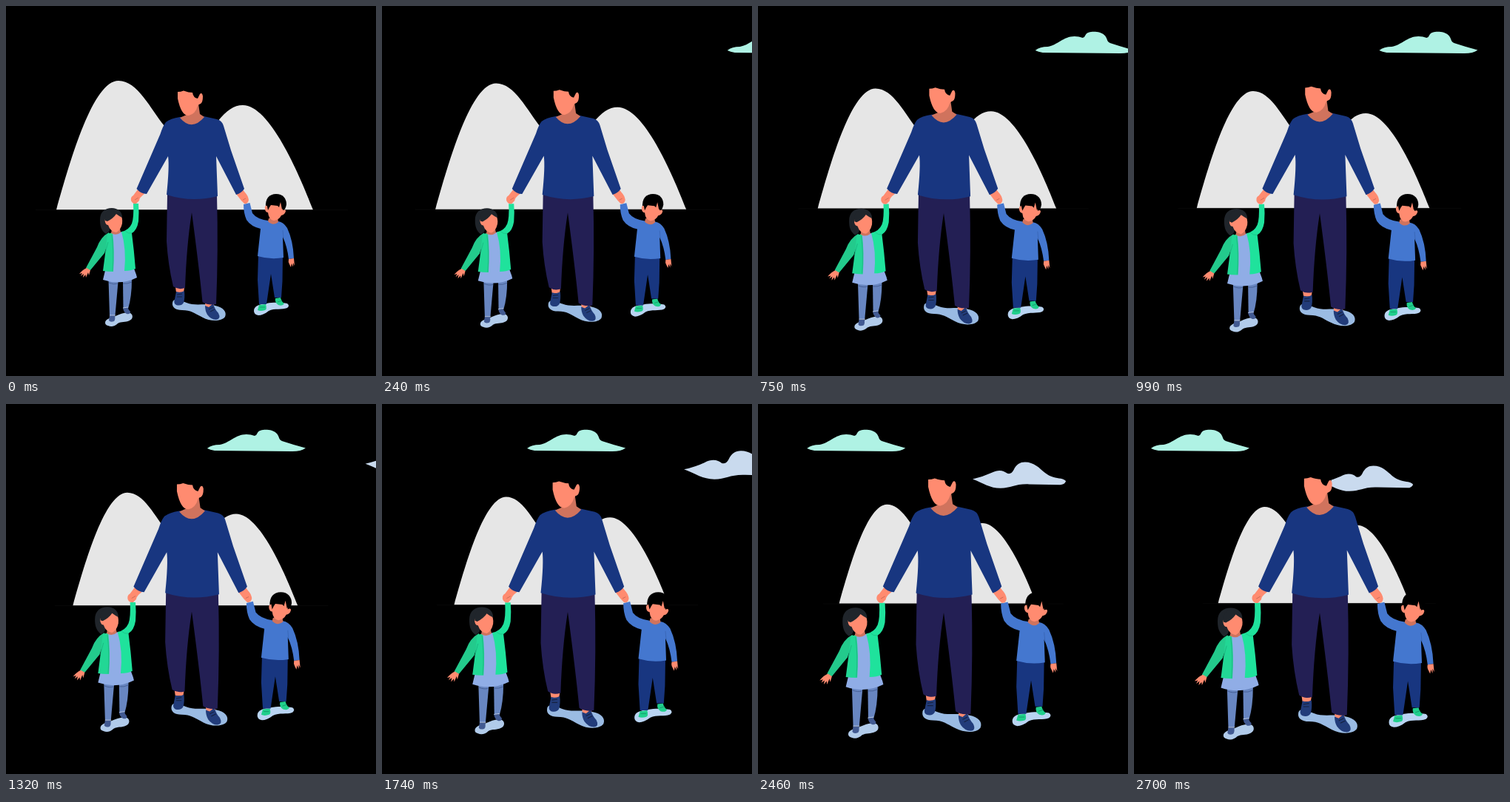
Animation of 500x500 px, one loop 2730 ms. Source, as an HTML page with a canvas:

```html
<!DOCTYPE html>
<html lang="en">
<head>
<meta charset="utf-8">
<title>Family walk</title>
<style>
  html, body { margin: 0; width: 100%; height: 100%; overflow: hidden; background: #000; }
  canvas { display: block; }
</style>
</head>
<body>
<canvas id="stage" width="500" height="500"></canvas>
<script>
const ctx = document.getElementById('stage').getContext('2d');
const LOOP = 2730;
const SKIN = '#ff8b70', NECK = '#d0735d', NAVY = '#183680', HAIR = '#20252b';
const GREEN = '#1fe29c', GREEN_DARK = '#23ca8c', SHOE = '#223c7a', INK = '#14203f';

const fill = (color, d) => ({ color, path: new Path2D(d) });
const line = (color, width, d) => ({ color, width, path: new Path2D(d) });

const mountains = [
  fill('#e6e6e6', `M68 275.5C88 204 118 101 152 101C178 101 195 139 214 162L250 200L286 156
    C298 141 308 134 320 134C356 134 395 224 415 275.5Z`),
  line('#0c0c0c', 0.8, 'M40 275.7H462')
];

const mintCloud = fill('#aff2e4', `M0 0Q6-5 17-5C30-7 38-19 53-19Q59-19 64-17Q67-18 68-21
  C71-27 88-26 93-21C98-17 96-12 101-10Q116-5 133-.5Q127 4 115 4L10 3Q4 2 0 0Z`);

const paleCloud = fill('#c9daee', `M0 0Q18-4 33-11C46-18 55-15 61-10Q68-8 72-16C77-26 83-30 92-30
  C108-30 118-19 126-12C137-3 147-2 155-1Q163 1 164 4Q161 10 154 10L99 9C75 8 68 16 49 16
  C30 16 19 7 0 0Z`);

const shadows = [
  fill('#9abbe3', `M225 401C226 393 236 398 244 401C256 406 270 401 283 405
    C293 407 299 413 296 420C291 427 275 426 266 421C254 415 250 411 238 411C229 411 224 407 225 401Z`),
  fill('#b1cbea', `M134 428C134 423 142 421 148 419C155 416 162 413 168 415
    C172 417 172 423 167 425C161 428 156 426 151 429C147 433 142 434 138 432Q134 431 134 428Z`),
  fill('#b9d4f2', `M335 412C335 405 343 403 352 402C362 400 374 401 380 402
    Q384 405 380 408C373 411 363 408 355 412C350 416 345 418 341 418Q335 417 335 412Z`)
];

const girl = [
  // legs and shoes
  fill('#6886c1', 'M138.5 370L151.5 373L147.5 418L140 418Z'),
  fill('#6886c1', 'M158 372L170 369Q170 393 165 409L158.5 409Z'),
  line('#3c5488', 0.7, 'M139 374Q146 377 151 375M158 375Q164 376 170 373'),
  fill('#425a92', 'M140 418L147 418Q148 424 146 426Q141 428 139 425Z'),
  fill('#425a92', 'M158 408L164 407Q166 411 168 413Q168 417 163 416Q159 414 158 408Z'),
  line('#dce8f8', 0.7, 'M140 418H148M158 408L165 407'),
  // hair behind the face
  fill(HAIR, 'M127 289C127 278 134 273 143 273C151 273 157 278 157 285L146 290L139 305L135 308C128 303 127 296 127 289Z'),
  // dress
  fill('#90ade6', 'M142 307L158 305L162 325L176 363L177 367Q155 378 131 370L137 345Z'),
  // arm and cardigan
  fill(GREEN_DARK, 'M139 306Q128 312 123 326L108 354Q110 357 114 357L133 334L141 310Z'),
  fill('#22d795', 'M137 308L144 306Q147 330 145 359Q137 359 131 358Q133 343 135 327Z'),
  line('#1aa878', 0.6, 'M134 334L138 319M143 309Q146 332 144 358'),
  fill(GREEN, `M156 305Q166 303 170 294Q173 286 172 267L179 267Q180 279 179 291Q177 303 170 307
    Q173 330 175 355Q169 358 160 358Q163 329 156 305Z`),
  line('#19b982', 0.6, 'M161 304Q165 308 170 307'),
  // hand
  fill(SKIN, 'M109 354L114 357L112 364L111 360L108 367L107.5 363L104 367L105 362L101 365L103 361L99 362Q104 356 109 354Z'),
  // neck and face
  fill(NECK, 'M143 302L154 301L155 306Q149 311 142 307Z'),
  fill(SKIN, 'M137 288C135 285 133 288 134 292Q135 296 138 296Q141 305 149 306Q155 303 157 294Q158 286 154 281L146 280Q139 284 137 288Z'),
  fill(HAIR, 'M134 290Q133 275 145 275Q155 276 157 286Q153 284 149 281Q145 287 137 291Z')
];

const boy = [
  // shoes and trousers
  fill('#20cf8c', 'M342 404L351 403Q353 410 350 411Q344 413 340 411Z'),
  fill('#20cf8c', 'M364 395L371 394Q372 399 376 402Q374 406 368 404Q363 401 364 395Z'),
  line('#138b62', 0.7, 'M343 407H350M367 400L373 398'),
  fill(NAVY, 'M341 336L374 338L373.5 372L372 394L363 394L358 362L352 403L342 403L340 370Z'),
  // sweater
  fill('#4477cf', `M321 268L329.5 266L333 280Q339 288 354 290Q361 297 368 291Q375 292 380 300
    Q388 317 389 341L382 342Q380 325 374 312L375 340Q357 343 340 338L344 301Q331 298 325 289Q321 280 321 268Z`),
  line('#345fab', 0.6, 'M374 303L375 314'),
  // hand
  fill(SKIN, 'M382 342L389 341L390 351L388 347L388 352.5L386 348L385 353L383 349Q381 346 382 342Z'),
  // neck and face
  fill(NECK, 'M355 287L367 286L368 292Q361 298 354 291Z'),
  fill('#000', 'M351 272C350 260 356 254 365 254C374 254 379 260 379 268Q378 275 374 277L355 277Z'),
  fill(SKIN, `M353 270Q349 269 350 275Q351 279 354 279Q355 289 362 290Q369 289 372 283
    Q377 282 378 277Q378 274 374 276L373 263L355 263Z`),
  fill('#000', 'M353 271Q352 257 365 257Q378 257 376 271L373 275L371 265L369 272L367 270L358 269L356 272L354 276Z')
];

const man = [
  // ankles and shoes
  fill(SKIN, 'M229 380L241 381L240 387L230 387Z'),
  fill(SKIN, 'M269 401L281 402L281 407L270 409Z'),
  fill(SHOE, 'M230 386Q236 388 241 385Q242 395 240 401Q237 406 230 404Q226 402 228 396Z'),
  fill(SHOE, 'M269 405L274 407L280 402Q282 410 287 415Q291 423 284 424Q277 424 272 417Q269 412 269 405Z'),
  line(INK, 1, 'M231 390L238 389M231 393L238 393M274 410L280 407M276 413L282 410'),
  // trousers
  fill('#231f54', `M218 254L285 255Q287 330 284 403Q273 405 265.5 400Q260.5 350 251 279
    Q244 323 242 381Q233 384 226 379Q219 350 217 318Z`),
  // hands
  fill(SKIN, 'M178 248L187 254Q180 259 180 263L176 267Q171 268 169 263Q168 258 172 256Z'),
  fill(SKIN, 'M311 254L320 248L323 252Q327 256 328 262Q327 268 322 267L318 263Z'),
  line('#bd624f', 0.7, 'M174 262L179 259M320 262L324 260'),
  // neck and sweater
  fill(NAVY, `M235 150Q222 152 216 157Q212 162 208.5 173L176.5 247Q182 254 190 254L219 203
    Q221 217 217 255Q251 266 286 257L284 203L311 255Q318 253 322 247L304 195L294 162
    Q292 155 285 153Q276 151 267 149Z`),
  fill(NECK, 'M244 147L260 132L262 146L268 150Q251 170 235 151Z'),
  // hair, face and ear
  fill('#000', 'M231 119Q227 103 246 101Q267 102 265 119L260 129L235 124Z'),
  fill(SKIN, `M232 116Q236 116 240 114.5Q247 117 252 117Q253 124 259 125L262 119Q265 116 266 122
    Q266 130 263 132Q260 133 259 135Q256 146 247 148Q237 149 232 125Z`)
];

function draw(shapes) {
  for (const { color, width, path } of shapes) {
    if (width) {
      ctx.strokeStyle = color;
      ctx.lineWidth = width;
      ctx.stroke(path);
    } else {
      ctx.fillStyle = color;
      ctx.fill(path);
    }
  }
}

function zoomed(cx, scale, paint) {
  ctx.save();
  ctx.translate(cx, 251);
  ctx.scale(scale, scale);
  ctx.translate(-cx, -251);
  paint();
  ctx.restore();
}

function drawAt(x, y, shape) {
  ctx.save();
  ctx.translate(x, y);
  draw([shape]);
  ctx.restore();
}

function render(t) {
  const progress = t / 2700;
  ctx.fillStyle = '#000';
  ctx.fillRect(0, 0, 500, 500);

  // The scenery recedes while the family comes closer.
  zoomed(248, 1 - 0.254 * progress, () => {
    draw(mountains);
    drawAt(439.5 - 0.19 * (t - 1740), 56.5, paleCloud);
  });
  drawAt(510 - 0.1804 * t, 60, mintCloud);
  zoomed(251, 1 + 0.113 * progress, () => [shadows, girl, boy, man].forEach(draw));
}

let start;
function tick(now) {
  start ??= now;
  render((now - start) % LOOP);
  requestAnimationFrame(tick);
}
render(0);
requestAnimationFrame(tick);
</script>
</body>
</html>
```
